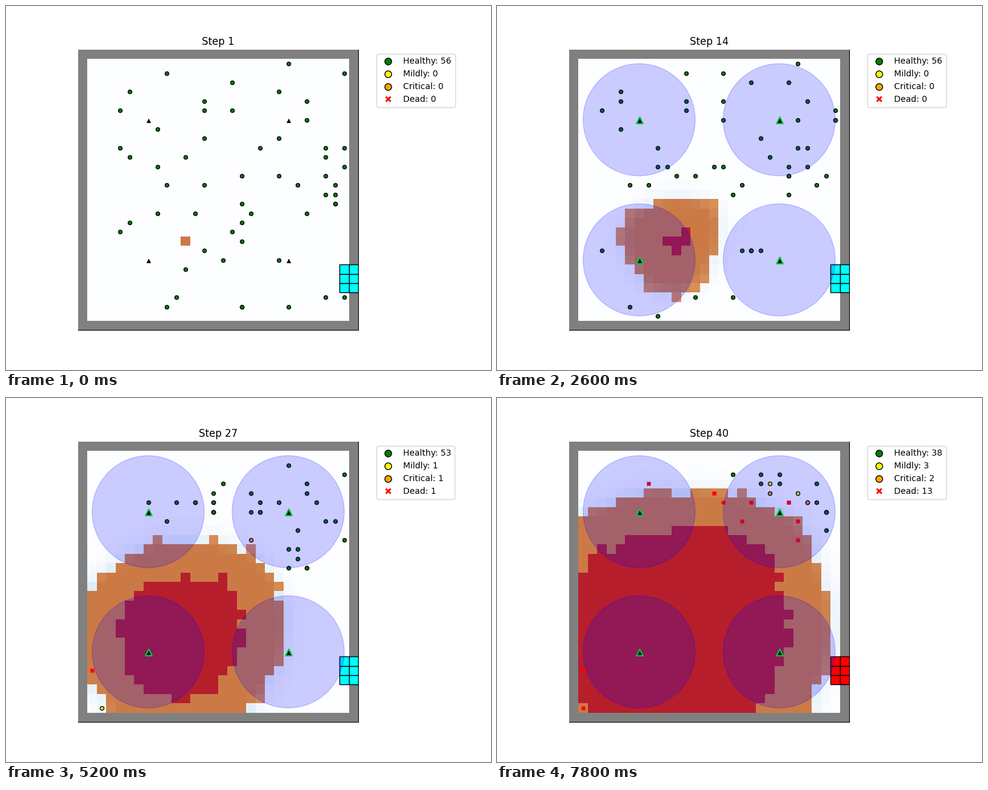
These frames come from a looping animation (800x600 px, 8000 ms). A matplotlib script:

```python
import numpy as np
import matplotlib.pyplot as plt
from matplotlib.animation import FuncAnimation
from matplotlib.lines import Line2D
from matplotlib.patches import Circle, Rectangle

N, STEPS, CROWD = 30, 40, 56
ALARM_STEP, BLOCKED_STEP, BURN_TIME = 13, 33, 10
EXIT, REFUGE, FIRE = (28, 24), (26, 6), (11, 20)
BEACONS = [(7, 7), (22, 7), (7, 22), (22, 22)]
ORANGE, RED = (253, 141, 60), (227, 26, 28)
COLORS = dict(Healthy="green", Mildly="yellow", Critical="orange", Dead="red")

# Fire front in eight directions, counter-clockwise from the right:
# cells per step, and the radius it lags behind.
SPEED = [0.45, 0.455, 0.40, 0.41, 0.45, 0.44, 0.45, 0.45]
LAG = [1.9, 1.0, 1.3, 0.8, 0.5, 1.1, 0.7, 2.0]


def ignition_steps(rng):
    """Step at which each cell catches fire."""
    y, x = np.mgrid[:N, :N]
    dx, dy = x - FIRE[0], FIRE[1] - y
    turn = np.degrees(np.arctan2(dy, dx))
    compass = np.arange(0, 360, 45)
    speed = np.interp(turn, compass, SPEED, period=360)
    lag = np.interp(turn, compass, LAG, period=360)
    born = (np.hypot(dx, dy) + lag - 0.3) / speed
    born = np.ceil(born + rng.uniform(-1.2, 1.2, born.shape))
    row = born[FIRE[1]]
    row[FIRE[0] - 1:FIRE[0] + 2] = 2
    row[FIRE[0]] = 1
    return born


def smoke_fields(born):
    """Smoke made by burning cells and spread by diffusion inside the walls."""
    s = np.zeros((N - 2, N - 2))
    fields = []
    for step in range(1, STEPS + 1):
        for _ in range(2):
            p = np.pad(s, 1, mode="edge")
            mean = (p[2:, 1:-1] + p[:-2, 1:-1]
                    + p[1:-1, 2:] + p[1:-1, :-2]) / 4
            s = s + 0.8 * (mean - s)
        s[born[1:-1, 1:-1] <= step] += 1 if step == 1 else 0.3
        s = np.minimum(s, 1)
        fields.append(s)
    return fields


def casualties(step):
    """Numbers of mildly hurt, critical and dead people."""
    keys = [21, 27, 36, 40]
    curves = [0, 1, 4, 3], [0, 1, 1, 2], [0, 1, 5, 13]
    return [int(round(np.interp(step, keys, c))) for c in curves]


def escaped(step):
    return int(np.interp(step, [1, 12, 21, BLOCKED_STEP], [0, 4, 13, 27]))


def gap(a, b):
    return abs(a[0] - b[0]) + abs(a[1] - b[1])


def walk(pos, step, rng):
    """Wander before the alarm; then head for safety around the fire."""
    x, y = pos

    def margin(p):
        return BORN[p[1], p[0]] - step

    options = [(a, b) for a, b in ((x + 1, y), (x - 1, y), (x, y + 1),
                                   (x, y - 1))
               if 0 < a < N - 1 and 0 < b < N - 1 and margin((a, b)) > 1]
    if not options:
        return pos
    west = x < 20
    hurry = rng.random() < (0.6 if west else 0.3)
    if margin(pos) < 4 or (step >= ALARM_STEP and hurry):
        upper = (west and y < 20) or step >= BLOCKED_STEP
        goal = REFUGE if upper else EXIT
        return min(options, key=lambda p: gap(p, goal)
                   - 0.5 * min(margin(p), 8) + 0.5 * rng.random())
    return options[rng.integers(len(options))]


def simulate(rng):
    """Places of the people in each state, step by step."""
    people = [(1 + int(28 * rng.random() ** 0.8),
               1 + int(28 * rng.random() ** 1.1)) for _ in range(CROWD)]
    dead, left, history = [], 0, []
    for step in range(1, STEPS + 1):
        if step > 1:
            people = [walk(p, step, rng) for p in people]
        people.sort(key=lambda p: gap(p, EXIT))
        out = escaped(step) - left
        people, left = people[out:], left + out
        # Those nearest to the fire are hurt first.
        people.sort(key=lambda p: BORN[p[1], p[0]])
        mild, crit, lost = casualties(step)
        fresh = lost - len(dead)
        dead, people = dead + people[:fresh], people[fresh:]
        history.append(dict(Healthy=people[crit + mild:],
                            Mildly=people[crit:crit + mild],
                            Critical=people[:crit], Dead=list(dead)))
    return history


BORN = ignition_steps(np.random.default_rng(7))
SMOKE = smoke_fields(BORN)
HISTORY = simulate(np.random.default_rng(4))


def floor(step):
    base = np.full((N, N, 3), 255.0)
    base[BORN <= step] = ORANGE
    base[BORN <= step - BURN_TIME] = RED
    haze = plt.cm.Blues(SMOKE[step - 1])[..., :3] * 255
    img = np.full((N, N, 3), 128.0)
    img[1:-1, 1:-1] = 0.8 * base[1:-1, 1:-1] + 0.2 * haze
    return np.rint(img).astype(np.uint8)


fig, ax = plt.subplots(figsize=(8, 6), dpi=100)
fig.subplots_adjust(right=0.75)
image = ax.imshow(floor(1), extent=(0, N, N, 0), interpolation="nearest")
ax.set(xticks=[], yticks=[])
ax.spines[["left", "top"]].set_visible(False)
title = ax.set_title("Step 1")

doors = [ax.add_patch(Rectangle((x, y), 1, 1, fc="cyan", ec="black", lw=1,
                                zorder=2))
         for x in (28, 29) for y in (23, 24, 25)]
beacons = ax.scatter(*(np.array(BEACONS).T + 0.5), s=60, marker="^",
                     c="black", edgecolors="white", linewidths=1.5, zorder=3)
zones = [ax.add_patch(Circle((x + 0.5, y + 0.5), 6, color="blue", alpha=0.2,
                             zorder=5)) for x, y in BEACONS]

groups, handles = {}, []
for state, color in COLORS.items():
    cross = state == "Dead"
    mark = "X" if cross else "o"
    groups[state] = ax.scatter([], [], s=20, marker=mark, c=color, zorder=4,
                               edgecolors="red" if cross else "black",
                               linewidths=0.8 if cross else 1)
    handles.append(Line2D([0], [0], color="w", marker=mark, markersize=8,
                          markerfacecolor=color,
                          markeredgecolor="w" if cross else "black",
                          label=f"{state}: 0"))
legend = ax.legend(handles=handles, loc="upper left", bbox_to_anchor=(1.05, 1))


def update(i):
    step = i + 1
    title.set_text(f"Step {step}")
    image.set_data(floor(step))
    alarm = step >= ALARM_STEP
    beacons.set_edgecolor("lime" if alarm else "white")
    for zone in zones:
        zone.set_visible(alarm)
    for door in doors:
        door.set_facecolor("red" if step >= BLOCKED_STEP else "cyan")
    hurt = casualties(step)
    totals = [CROWD - sum(hurt)] + hurt
    for state, n, text in zip(COLORS, totals, legend.get_texts()):
        spots = np.array(HISTORY[i][state], float).reshape(-1, 2)
        groups[state].set_offsets(spots + 0.5)
        text.set_text(f"{state}: {n}")
    return []


anim = FuncAnimation(fig, update, frames=STEPS, interval=200, repeat=True,
                     repeat_delay=0, init_func=lambda: update(0))
plt.show()
```
